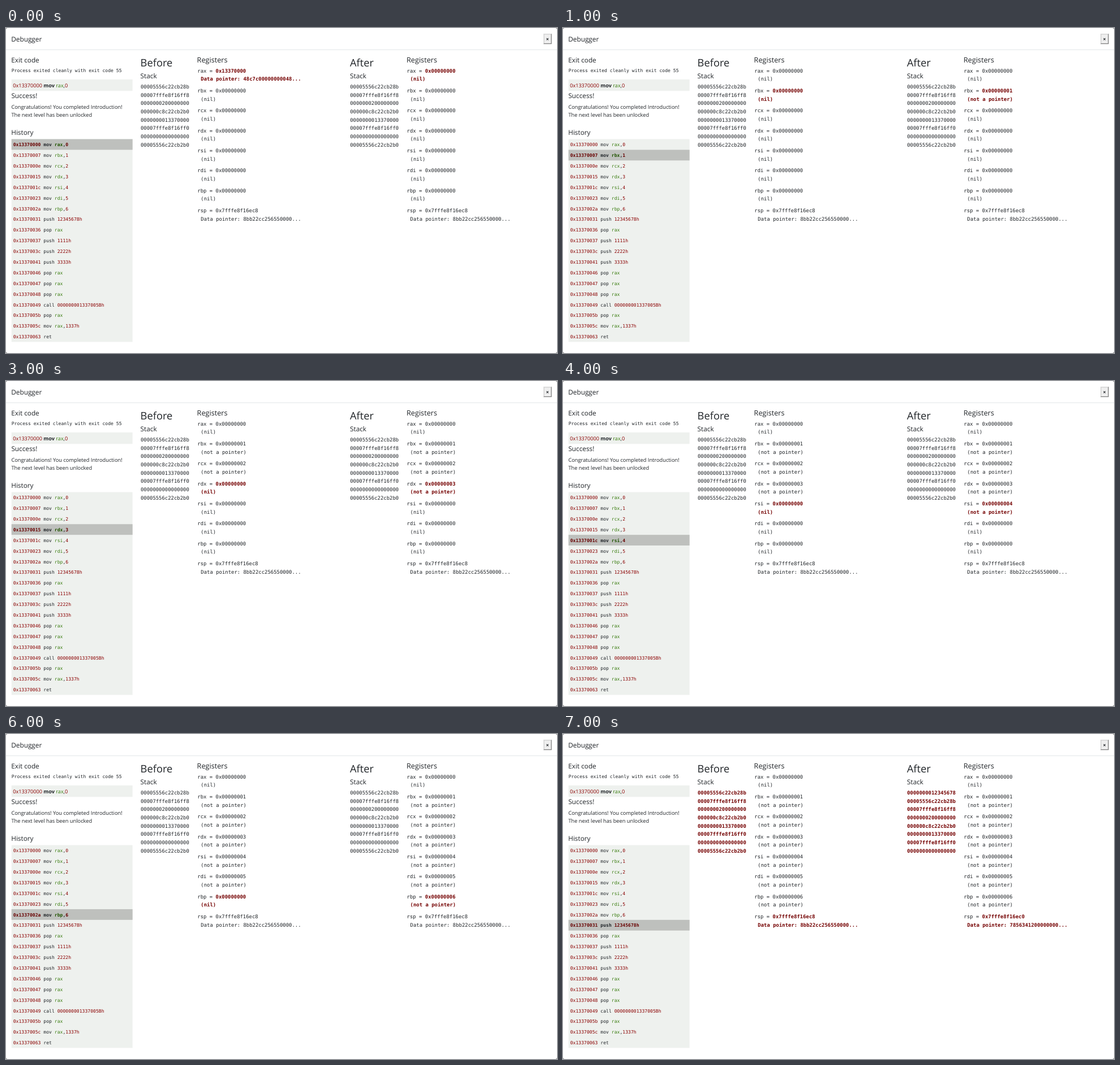
Animation of 974 by 575 pixels, one loop 8000 ms. Source, as an HTML page:

```html
<!DOCTYPE html>
<html lang="en">
<head>
<meta charset="utf-8">
<title>Debugger</title>
<style>
  html, body { margin: 0; width: 100%; height: 100%; overflow: hidden; background: #fff; }
  svg { display: block; width: 974px; height: 575px; }
  text { font: 500 9.28px "Open Sans", "Noto Sans", sans-serif; fill: #212529; white-space: pre; text-rendering: geometricPrecision; }
  .head { font-size: 11.8px; font-weight: 400; }
  .regs { font-size: 12.7px; font-weight: 400; }
  .big { font-size: 18.3px; font-weight: 400; }
  .code { font-size: 9.15px; }
  .mono { font: 8.93px "DejaVu Sans Mono", "Noto Sans Mono", monospace; }
  .list { font-size: 8.1px; }
  .num { fill: #8b0000; }
  .reg { fill: #3a7d10; }
  .hot { font-weight: 700; fill: #740000; }
  .current { font-weight: 700; }
  .current .num { fill: #680000; }
  .current .reg { fill: #205400; }
  .bold { font-weight: 700; }
</style>
</head>
<body>
<svg viewBox="0 0 974 575">
  <rect width="974" height="575" fill="#7c7c7c"/>
  <rect width="974" height="575" rx="3" fill="#fff"/>
  <rect y="38" width="974" height="1" fill="#e3e6e9"/>
  <rect x="950" y="10" width="14.6" height="18.3" fill="#767676"/>
  <path d="M950 10h14.6l-1.2 1.2h-12.2v15.9l-1.2 1.2z" fill="#dcdcdc"/>
  <rect x="951.2" y="11.2" width="12.2" height="15.9" fill="#efefef"/>
  <text x="957.1" y="23.2" text-anchor="middle" class="bold">×</text>
  <rect x="9.7" y="91" width="214" height="20.3" fill="#eef1ee"/>
  <rect x="9.7" y="196.6" width="214" height="358.8" fill="#eef1ee"/>
  <g id="fixed"></g>
  <g id="live"></g>
</svg>
<script>
const STEP = 1000, STEPS = 8, ROW = 18.89;
const program = [
  "00 mov rax,0", "07 mov rbx,1", "0e mov rcx,2", "15 mov rdx,3", "1c mov rsi,4",
  "23 mov rdi,5", "2a mov rbp,6", "31 push 12345678h", "36 pop rax", "37 push 1111h",
  "3c push 2222h", "41 push 3333h", "46 pop rax", "47 pop rax", "48 pop rax",
  "49 call 000000001337005Bh", "5b pop rax", "5c mov rax,1337h", "63 ret"
].map(line => "0x133700" + line);
const names = ["rax", "rbx", "rcx", "rdx", "rsi", "rdi", "rbp", "rsp"];
const stack = [
  "00005556c22cb28b", "00007fffe8f16ff8", "0000000200000000", "000000c8c22cb2b0",
  "0000000013370000", "00007fffe8f16ff0", "0000000000000000", "00005556c22cb2b0"
];

const text = (x, y, body, cls = "") => `<text x="${x}" y="${y}" class="${cls}">${body}</text>`;
const span = (cls, body) => `<tspan class="${cls}">${body}</tspan>`;

function instruction(line, opClass = "") {
  const [addr, op, args = ""] = line.split(" ");
  const colored = args.split(",").map(a => span(names.includes(a) ? "reg" : "num", a)).join(",");
  return `${span("num", addr)} ${span(opClass, op)} ${colored}`;
}

// Value and description of a register once `done` instructions have run.
function register(i, done) {
  if (i === 7) return done > 7
    ? ["0x7fffe8f16ec0", "Data pointer: 7856341200000000..."]
    : ["0x7fffe8f16ec8", "Data pointer: 8bb22cc256550000..."];
  if (i === 0 && done === 0) return ["0x13370000", "Data pointer: 48c7c00000000048..."];
  const value = done > i ? i : 0;
  return ["0x0000000" + value, value ? "(not a pointer)" : "(nil)"];
}

function machine(x, step, done) {
  const pushed = step === 7;
  const words = done > 7 ? ["0000000012345678", ...stack.slice(0, 7)] : stack;
  let out = words.map((w, i) => text(x, 107.2 + i * 14.63, w, pushed ? "mono hot" : "mono")).join("");
  names.forEach((name, i) => {
    const [value, note] = register(i, done);
    const hot = i === step ? "hot" : "";
    const y = 78.8 + i * 35.33;
    out += text(x + 100.4, y, `${name} = ${span(hot, value)}`, "mono");
    out += text(x + 106.4, y + 14.65, note, "mono " + hot);
  });
  return out;
}

function fixedParts() {
  const panel = (x, title) => text(x, 68.3, title, "big") + text(x, 88.7, "Stack", "head")
    + text(x + 100, 60.8, "Registers", "regs");
  return text(9.2, 24.3, "Debugger", "head")
    + text(9.2, 60.8, "Exit code", "head")
    + text(9.7, 77.6, "Process exited cleanly with exit code 55", "mono list")
    + text(12.2, 104.8, instruction(program[0], "bold"), "code")
    + text(9.4, 124.2, "Success!", "head")
    + text(9.4, 142.7, "Congratulations! You completed Introduction!")
    + text(9.4, 157.3, "The next level has been unlocked")
    + text(9.2, 189.3, "History", "head")
    + panel(237.6, "Before") + panel(608, "After");
}

function liveParts(step) {
  const rows = program.map((line, i) =>
    text(12.7, 209.2 + i * ROW, instruction(line), "mono list" + (i === step ? " current" : ""))).join("");
  return `<rect x="9.7" y="${196.6 + step * ROW}" width="214" height="${ROW}" fill="#bec0bd"/>`
    + rows + machine(237.9, step, step) + machine(608.2, step, step + 1);
}

const live = document.getElementById("live");
let shown = -1;
function draw() {
  const step = Math.floor(performance.now() / STEP) % STEPS;
  if (step !== shown) live.innerHTML = liveParts(shown = step);
  requestAnimationFrame(draw);
}
document.getElementById("fixed").innerHTML = fixedParts();
draw();
</script>
</body>
</html>
```
